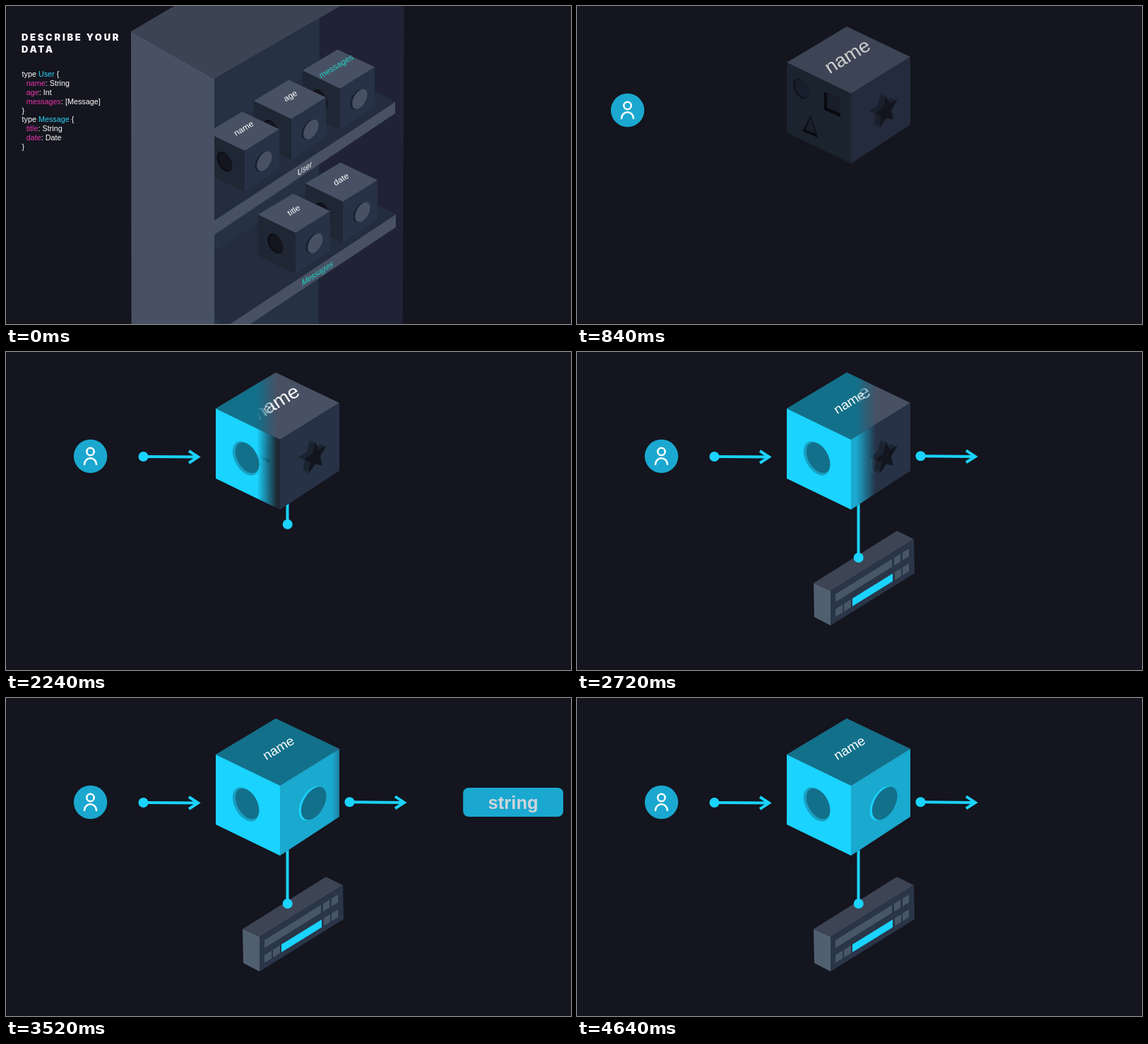
An HTML page that plays this animation: 800 by 450 pixels, repeating every 4680 ms.

```html
<!DOCTYPE html>
<html lang="en">
<head>
<meta charset="utf-8">
<title>Describe your data</title>
<style>
html, body { margin: 0; width: 100%; height: 100%; overflow: hidden; background: #14151e; }
svg { display: block; width: 100vw; height: 100vh; font-family: "Liberation Sans", Arial, sans-serif; }
text { fill: #fff; white-space: pre; }
.mid { text-anchor: middle; }
.head { font: 900 13px Inter, sans-serif; letter-spacing: 2.7px; }
.code { font-size: 10.8px; }
.label { font-size: 12px; }
.type { fill: #2fd0f5; }
.field { fill: #e535ab; }
.link { fill: #22d3c5; }

/* Every animation shares one 4680 ms loop. */
.scene, .out, .cube, .user, .clip1, .clip2, .wipe, .drop, .device, .pill {
  animation: 4680ms linear infinite;
}
.scene { animation-name: scene; }
.out {
  animation-name: shrink, fade;
  animation-timing-function: cubic-bezier(.6, -.28, .735, .045), ease-in;
  animation-delay: var(--d);
}
.soft { animation-timing-function: cubic-bezier(.6, -.17, .735, .045), ease-in; }
.cube { animation-name: appear; }
.user { animation-name: enter; }
.clip1, .clip2 { transform-origin: 187px 148px; }
.clip1 { animation-name: draw1; }
.clip2 { animation-name: draw2; }
.wipe { animation-name: wipe; }
.drop { animation-name: drop; }
.device { animation-name: rise; }
.pill { animation-name: slide; }

@keyframes scene { 0%, 14.9% { visibility: visible; } 14.95%, 100% { visibility: hidden; } }
/* Items return while the scene is hidden, so each delay still starts from a full shelf. */
@keyframes shrink {
  0%, 94.01%, 100% { transform: scale(1); }
  8.547%, 94% { transform: scale(0); }
}
@keyframes fade {
  0%, 94.01%, 100% { opacity: 1; }
  8.547%, 94% { opacity: 0; }
}
@keyframes appear { 0%, 13.2% { opacity: 0; } 19.2%, 100% { opacity: 1; } }
@keyframes enter {
  0%, 12.8% { transform: translateX(-144px); animation-timing-function: ease-out; }
  23.5%, 100% { transform: none; }
}
@keyframes draw1 { 0%, 23.9% { transform: scaleX(0); } 29.5%, 100% { transform: none; } }
@keyframes draw2 { 0%, 51.3% { transform: scaleX(0); } 56.9%, 100% { transform: none; } }
@keyframes wipe {
  0%, 25% { transform: translateX(280px); }
  77.78%, 100% { transform: translateX(486px); }
}
@keyframes drop {
  0%, 44.43% { opacity: 0; transform: translateY(-91px); }
  44.44% { opacity: 1; transform: translateY(-91px); }
  51.6%, 100% { opacity: 1; transform: none; }
}
@keyframes rise { 0%, 49.1% { opacity: 0; } 55.5%, 100% { opacity: 1; } }
@keyframes slide {
  0%, 61.1% { opacity: 0; transform: translateX(-29px); }
  65.4% { opacity: 1; transform: translateX(-12px); }
  68.38% { opacity: 1; transform: none; }
  71.8% { transform: translateX(18px); }
  83.76% { transform: translateX(95px); }
  98.3%, 100% { opacity: 1; transform: translateX(194px); }
}
</style>
</head>
<body>
<svg viewBox="0 0 800 450">
  <defs>
    <!-- Cubes are placed by their front top corner. -->
    <g id="faces">
      <path d="M0 0 -91-44-6-95 84-52z" fill="var(--top)"/>
      <path d="M0 0-91-44V55L0 99z" fill="var(--left)"/>
      <path d="M0 0 84-52V44L0 99z" fill="var(--right)"/>
    </g>
    <g id="dark" style="--top:#485164;--left:#1e2733;--right:#273246"><use href="#faces"/></g>
    <g id="box">
      <use href="#dark"/>
      <g transform="matrix(.85 .45 0 1 -49 26)">
        <circle r="22" fill="#0c0d14"/>
        <circle cx="2.5" cy="-1" r="19.5" fill="#14151e"/>
      </g>
      <g transform="matrix(.85 -.5 0 1 46 25)">
        <circle cx="-3" cy="-1" r="22" fill="#192130"/>
        <circle cx="2" cy="1" r="21.5" fill="#485164"/>
      </g>
    </g>
    <path id="star" d="M0-22 5.6-7.7 20.9-6.8 9.1 2.9 12.9 17.8 0 9.5-12.9 17.8-9.1 2.9-20.9-6.8-5.6-7.7z"
      transform="matrix(.76 -.46 0 1 50 25)"/>
    <g id="arrow" fill="none" stroke="#1ad3ff" stroke-width="4">
      <circle cx="194.5" cy="148" r="7" fill="#1ad3ff" stroke="none"/>
      <path d="M195 148 271 148.6M259 140 272 148.6 259 157"/>
    </g>
    <linearGradient id="edge" gradientUnits="userSpaceOnUse" x1="-14" x2="14" y1="0" y2="0">
      <stop stop-color="#fff"/><stop offset="1" stop-color="#fff" stop-opacity="0"/>
    </linearGradient>
    <mask id="lit" maskUnits="userSpaceOnUse" x="0" y="0" width="800" height="450">
      <rect class="wipe" x="-300" width="314" height="450" fill="url(#edge)"/>
    </mask>
    <clipPath id="reveal1"><rect class="clip1" x="187" y="135" width="90" height="26"/></clipPath>
    <clipPath id="reveal2"><rect class="clip2" x="187" y="135" width="90" height="26"/></clipPath>
  </defs>

  <rect width="800" height="450" fill="#14151e"/>

  <g class="scene">
    <path class="out" style="--d:135ms;transform-origin:370px 329px" fill="#263144" d="M295 103 560-50V700H295z"/>
    <path class="out" style="--d:183ms;transform-origin:370px 300px" fill="#202235" d="M444 14 564-57 561 600H442z"/>
    <g class="out" style="--d:171ms;transform-origin:291px 246px">
      <path fill="#232d3f" d="M193 250 451 82 551 136 293 304z"/>
      <path fill="#485164" d="M293 305 551 136V152L293 325z"/>
    </g>
    <g class="out" style="--d:138ms;transform-origin:364px 439px">
      <path fill="#232d3f" d="M245 380 451 245 552 295 310 455z"/>
      <path fill="#485164" d="M310 455 552 295V313L310 474z"/>
    </g>
    <g class="out" style="--d:185ms;transform-origin:471px 118px">
      <use href="#box" transform="translate(473 117) scale(.585)"/>
      <text class="label mid link" transform="matrix(.857 -.514 .52 .8 468 86)" y="3">messages</text>
    </g>
    <g class="out" style="--d:171ms;transform-origin:403px 161px">
      <use href="#box" transform="translate(404 160) scale(.585)"/>
      <text class="label mid" transform="matrix(.857 -.514 .52 .8 403 128)" y="3">age</text>
    </g>
    <g class="out" style="--d:166ms;transform-origin:336px 206px">
      <use href="#box" transform="translate(338 205) scale(.585)"/>
      <text class="label mid" transform="matrix(.857 -.514 .52 .8 337 174)" y="3">name</text>
    </g>
    <g class="out" style="--d:146ms;transform-origin:475px 278px">
      <use href="#box" transform="translate(477 277) scale(.585)"/>
      <text class="label mid" transform="matrix(.857 -.514 .52 .8 475 246)" y="3">date</text>
    </g>
    <g class="out" style="--d:135ms;transform-origin:409px 322px">
      <use href="#box" transform="translate(410 321) scale(.585)"/>
      <text class="label mid" transform="matrix(.857 -.514 .52 .8 408 290)" y="3">title</text>
    </g>
    <g class="out" style="--d:166ms;transform-origin:423px 230px">
      <text class="label mid" transform="matrix(.8 -.52 0 1.1 423 230)" y="4">User</text>
    </g>
    <g class="out" style="--d:128ms;transform-origin:441px 378px">
      <text class="label mid link" transform="matrix(.8 -.52 0 1.1 441 378)" y="4">Messages</text>
    </g>
    <path class="out" style="--d:171ms;transform-origin:370px 328px" fill="#485164" d="M179 151 263 200V600H179z"/>
    <g class="out" style="--d:135ms;transform-origin:370px 329px">
      <path fill="#3c4454" d="M177 36 440-119 560-50 295 103z"/>
      <path fill="#485164" d="M177 36 295 103V700H178z"/>
    </g>

    <g class="out soft head" style="--d:250ms;transform-origin:93px 53px">
      <text x="22" y="49">DESCRIBE YOUR</text>
      <text x="22" y="66">DATA</text>
    </g>
    <g class="out soft code" style="--d:197ms;transform-origin:78px 148px">
      <text x="22.5" y="100">type <tspan class="type">User</tspan> {</text>
      <text x="28.7" y="112.9"><tspan class="field">name</tspan>: String</text>
      <text x="28.7" y="125.7"><tspan class="field">age</tspan>: Int</text>
      <text x="28.7" y="138.6"><tspan class="field">messages</tspan>: [Message]</text>
      <text x="22.5" y="151.5">}</text>
      <text x="22.5" y="164.3">type <tspan class="type">Message</tspan> {</text>
      <text x="28.7" y="177.2"><tspan class="field">title</tspan>: String</text>
      <text x="28.7" y="190.1"><tspan class="field">date</tspan>: Date</text>
      <text x="22.5" y="203">}</text>
    </g>
  </g>

  <g class="device">
    <path fill="#3d4454" d="M335 327 453 253 477 265 359 338z"/>
    <path fill="#516070" d="M335 327 359 338V387L336 375z"/>
    <path fill="#2a3548" d="M359 338 477 265 478 313 359 387z"/>
    <g transform="matrix(1 -.62 0 1 359 338)" fill="#485766">
      <path d="M7 9h80v11H7zM90 9h9v11h-9zM102 9h9v11h-9z"/>
      <path d="M7 30h10v11H7zM19 30h10v11H19zM91 30h9v11h-9zM102 30h9v11h-9z"/>
      <path d="M31 30h57v11H31z" fill="#1ad3ff"/>
    </g>
  </g>
  <g class="drop" fill="#1ad3ff">
    <rect x="396.5" y="200" width="4" height="91"/>
    <circle cx="398.7" cy="291" r="7"/>
  </g>

  <g class="cube">
    <g transform="translate(388 124)">
      <use href="#dark"/>
      <g transform="matrix(.85 .45 0 1 -71 -7)">
        <circle r="13" fill="#10141d"/>
        <circle cx="2" cy="-1" r="11.5" fill="#1a2230"/>
      </g>
      <path d="M-38-2-15 7V33L-38 23z" fill="#05060a"/>
      <path d="M-34 0-15 7V28L-34 20z" fill="#1a212c"/>
      <path d="M-57 31-47 62-69 53z" fill="#05060a"/>
      <path d="M-57 33-50 57-65 51z" fill="#1a212c"/>
      <g fill="#1b2330">
        <use href="#star" x="-8" y="-3"/><use href="#star" x="-6" y="-2"/>
        <use href="#star" x="-4" y="-1.5"/><use href="#star" x="-2" y="-.7"/>
      </g>
      <use href="#star" fill="#13151e"/>
    </g>
    <text class="mid" font-size="28" transform="matrix(.857 -.514 .52 .8 384 73)" y="7">name</text>
  </g>
  <g mask="url(#lit)">
    <g transform="translate(388 124)" style="--top:#13708a;--left:#1ad3ff;--right:#1aa9cf">
      <use href="#faces"/>
      <g transform="matrix(.85 .45 0 1 -48.5 26.5)">
        <circle r="22" fill="#189fc3"/>
        <circle cx="2.5" cy="-2" r="19.8" fill="#13708a"/>
      </g>
      <g transform="matrix(.85 -.5 0 1 46 25)">
        <circle cx="-1" cy="-.5" r="21.8" fill="#1ad3ff"/>
        <circle cx="2" cy="1" r="21" fill="#13708a"/>
      </g>
    </g>
    <text class="mid" font-size="19.2" transform="matrix(.857 -.514 .52 .8 386.5 72)" y="5">name</text>
  </g>

  <g class="user">
    <circle cx="119.6" cy="147.5" r="23.7" fill="#1aa8d0"/>
    <g fill="none" stroke="#fff" stroke-width="2.6" stroke-linecap="round">
      <circle cx="119.5" cy="141" r="5.2"/>
      <path d="M111 159a8.5 8.7 0 0 1 17 0"/>
    </g>
  </g>
  <g clip-path="url(#reveal1)"><use href="#arrow"/></g>
  <g transform="translate(292 -.7)"><g clip-path="url(#reveal2)"><use href="#arrow"/></g></g>

  <g class="pill">
    <rect x="607" y="127" width="142" height="41" rx="8" fill="#1aa8d0"/>
    <text class="mid" x="678" y="157" font-size="25.6" font-weight="700" style="fill:#ced4da">string</text>
  </g>
</svg>
</body>
</html>
```
